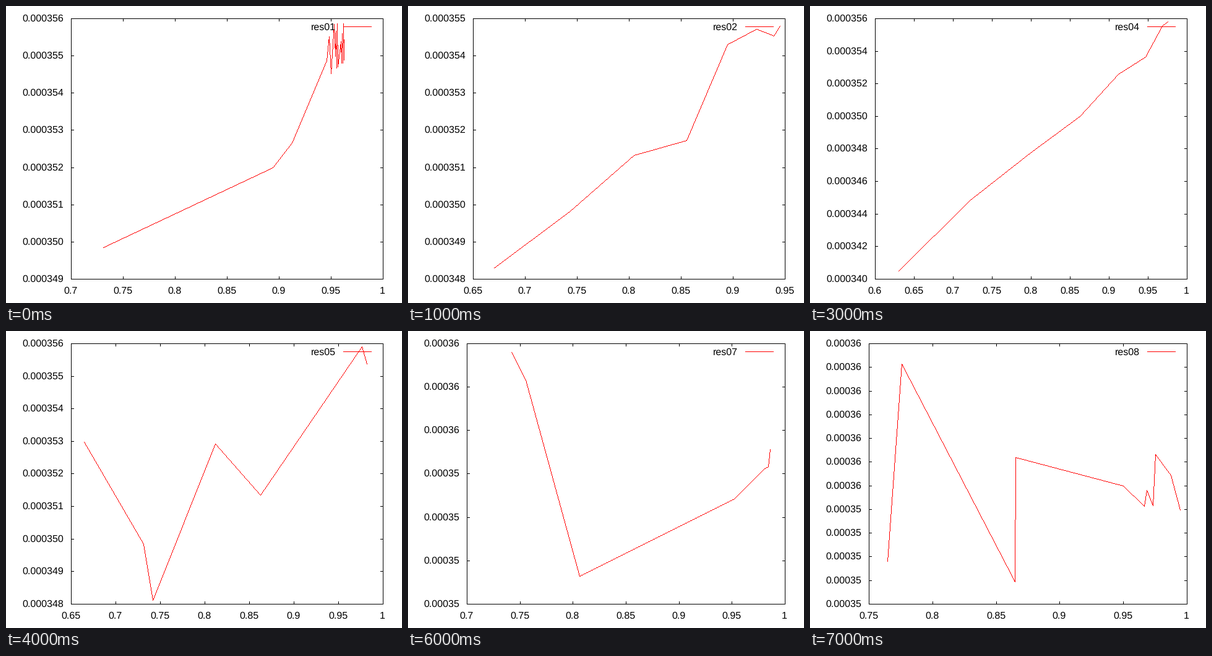
A matplotlib script that plays this animation: 640x480 px, repeating every 8000 ms.

```python
import math

import matplotlib.pyplot as plt
import numpy as np
from matplotlib.animation import FuncAnimation

W, H, DPI = 640, 480, 100
TOP, BOTTOM, RIGHT = 20, 441, 609
TICK = 4
X_STEP = 0.05
BLACK, RED = (0, 0, 0), (255, 0, 0)

plt.rcParams["font.family"] = "Liberation Sans"
plt.rcParams["font.size"] = 16 * 72 / DPI
plt.rcParams["text.hinting"] = "no_hinting"

# Bends shared by several runs; y is in millionths
START, DIP, PEAK = (0.731, 349.85), (0.742, 348.11), (0.9765, 355.9)


def jitter(x0, x1, middle, n, seed):
    """Zigzag around one level."""
    rng = np.random.default_rng(seed)
    xs = np.sort(rng.uniform(x0, x1, n))
    ys = middle + (-1) ** np.arange(n) * rng.uniform(0.1, 0.7, n)
    return list(zip(xs, ys))


def climb(x0, x1, y0, y1, n, seed):
    """Slowing rise with a little noise."""
    rng = np.random.default_rng(seed)
    s = 1 - (1 - np.linspace(0, 1, n)) ** 2
    ys = y0 + (y1 - y0) * (s + rng.normal(0, 0.06, n) * (s < 1) * (s > 0))
    return list(zip(x0 + (x1 - x0) * s, np.clip(ys, y0, y1)))


RUNS = [
    [START, (0.894, 352), (0.9125, 352.65), (0.946, 354.87)]
    + jitter(0.947, 0.963, 355.2, 15, 4),
    climb(0.67, 0.945, 348.3, 354.8, 8, 2),
    [(0.661, 349.42), (0.686, 347.17), DIP, (0.761, 351.6), (0.8326, 351.68),
     (0.974, 353.99), PEAK, (0.981, 355.1), (0.9875, 354.67)],
    climb(0.63, 0.975, 340.5, 355.8, 8, 7),
    [(0.6646, 352.98), START, DIP, (0.812, 352.92), (0.8625, 351.34), PEAK,
     (0.982, 355.37)],
    [(0.6246, 349.18), DIP, (0.784, 356.96), (0.8246, 352.62), (0.937, 354.88),
     (0.967, 354.03), PEAK, (0.983, 354.35), (0.986, 354.71)],
    [(0.742, 357.8), (0.7554, 357.16), (0.8062, 352.64), (0.952, 354.42),
     (0.981, 355.12), (0.984, 355.16), (0.986, 355.57)],
    [(0.7646, 352.8), (0.7758, 361.14), (0.8648, 351.94), (0.8653, 357.19),
     (0.95, 355.99), (0.9664, 355.13), (0.9684, 355.81), (0.9733, 355.15),
     (0.9752, 357.32), (0.9874, 356.43), (0.9947, 354.97)],
]

fig = plt.figure(figsize=(W / DPI, H / DPI), dpi=DPI, facecolor="white")
ax = fig.add_axes([0, 0, 1, 1])


def stroke(canvas, points, color=BLACK):
    """Hard polyline, one pixel wide."""
    points = np.rint(points).astype(int)
    for a, b in zip(points, points[1:]):
        n = np.abs(b - a).max() + 1
        xs, ys = np.rint(np.linspace(a, b, n)).astype(int).T
        canvas[ys, xs] = color


def label(x, y, text, ha):
    ax.text(x, y, text, ha=ha, va="baseline", color="black")


def draw(i):
    xs, ys = np.array(RUNS[i]).T
    first, last = math.floor(xs.min() / X_STEP), math.ceil(xs.max() / X_STEP)
    low, high = math.floor(ys.min()), math.ceil(ys.max())
    step = 2 if high - low > 12 else 1
    short = high > 357
    left = 95 if short else 105

    def px(x):
        return left + (x / X_STEP - first) / (last - first) * (RIGHT - left)

    def py(y):
        return BOTTOM - (y - low) / (high - low) * (BOTTOM - TOP)

    canvas = np.full((H, W, 3), 255, np.uint8)
    ax.clear()
    ax.axis("off")

    for v in range(low, high + 1, step):
        y = round(py(v))
        stroke(canvas, [(left, y), (left + TICK, y)])
        stroke(canvas, [(RIGHT - TICK, y), (RIGHT, y)])
        digits = (v + 4) // 10 if short else v
        label(left - 12.5, y + 4.5, f"0.000{digits}", "right")

    for k in range(first, last + 1):
        x = round(px(k * X_STEP))
        stroke(canvas, [(x, TOP), (x, TOP + TICK)])
        stroke(canvas, [(x, BOTTOM - TICK), (x, BOTTOM)])
        label(x - 1, 464.5, f"{k * X_STEP:.3g}", "center")

    label(532.5, 38.5, f"res{i + 1:02d}", "right")
    stroke(canvas, [(545, 33), (590, 33)], RED)
    stroke(canvas, np.column_stack([px(xs), py(ys)]), RED)
    stroke(canvas, [(left, TOP), (RIGHT, TOP), (RIGHT, BOTTOM),
                    (left, BOTTOM), (left, TOP)])
    ax.imshow(canvas, interpolation="nearest", aspect="auto")
    return []


anim = FuncAnimation(fig, draw, frames=len(RUNS), interval=1000,
                     init_func=lambda: [], repeat=True, repeat_delay=0)
plt.show()
```
